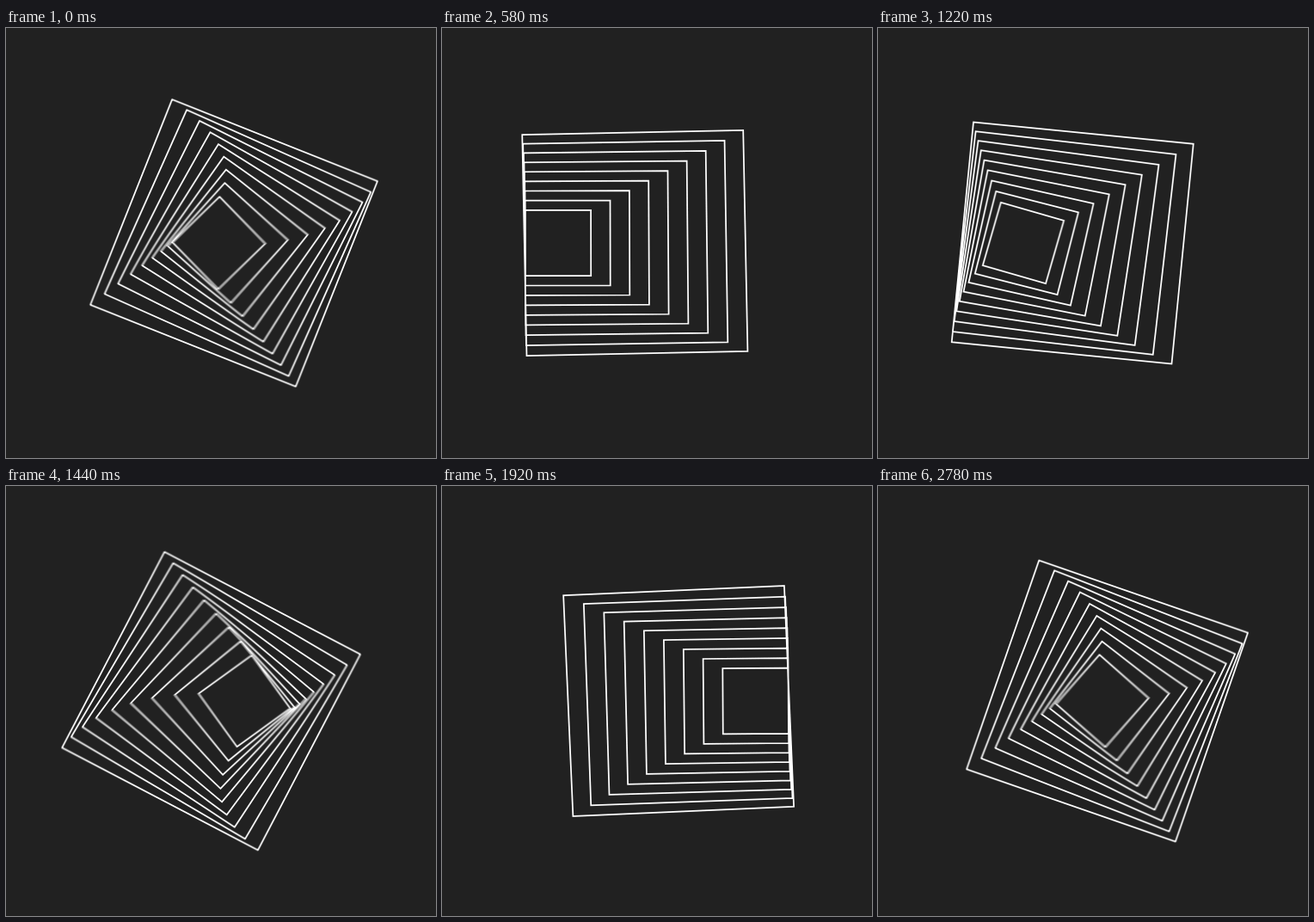
An HTML page with a canvas for the animation above (2.8 s loop, 500 by 500 pixels).

```html
<!DOCTYPE html>
<html lang="en">
<head>
<meta charset="utf-8">
<title>Sliding squares</title>
<style>
  html, body { margin: 0; width: 100%; height: 100%; overflow: hidden; background: #212121; }
  canvas { display: block; width: 500px; height: 500px; }
</style>
</head>
<body>
<canvas id="stage" width="500" height="500"></canvas>
<script>
const ctx = document.getElementById('stage').getContext('2d');

const LOOP = 2800;
const HALF = LOOP / 2;
const FRAME = 20;
const COUNT = 9;
const SHUTTER = 5;
const SAMPLES = 8;

const easeInOut = (p, power) =>
  p < 0.5 ? 0.5 * (2 * p) ** power : 1 - 0.5 * (2 - 2 * p) ** power;

// Square 0 is the largest; smaller ones travel further and lead in time.
function addSquare(i, time) {
  const half = (257 - 22.6 * i) / 2;
  const reach = 26 + 11.125 * i;
  const middle = 130 - 16.7 * i;
  const turns = (time - middle) / HALF + 0.5;
  const pass = Math.floor(turns);
  const p = turns - pass;
  const side = pass % 2 === 0 ? 1 : -1;
  const x = 250 + side * reach * (1 - 2 * easeInOut(p, 4.2));
  const angle = easeInOut(p, 3.55) * Math.PI / 2;
  const c = half * Math.cos(angle);
  const s = half * Math.sin(angle);
  ctx.moveTo(x - c + s, 250 - s - c);
  ctx.lineTo(x + c + s, 250 + s - c);
  ctx.lineTo(x + c - s, 250 + s + c);
  ctx.lineTo(x - c - s, 250 - s + c);
  ctx.closePath();
}

function draw(time) {
  ctx.globalCompositeOperation = 'source-over';
  ctx.fillStyle = '#212121';
  ctx.fillRect(0, 0, 500, 500);

  // Average several moments for motion blur.
  ctx.globalCompositeOperation = 'lighter';
  ctx.strokeStyle = `rgba(222, 222, 222, ${1 / SAMPLES})`;
  ctx.lineWidth = 1.7;
  for (let k = 0; k < SAMPLES; k++) {
    const moment = time + SHUTTER * ((k + 0.5) / SAMPLES - 0.5);
    ctx.beginPath();
    for (let i = 0; i < COUNT; i++) addSquare(i, moment);
    ctx.stroke();
  }
}

const start = performance.now();

function tick() {
  const elapsed = (performance.now() - start) % LOOP;
  draw(Math.floor(elapsed / FRAME) * FRAME);
  requestAnimationFrame(tick);
}

tick();
</script>
</body>
</html>
```
